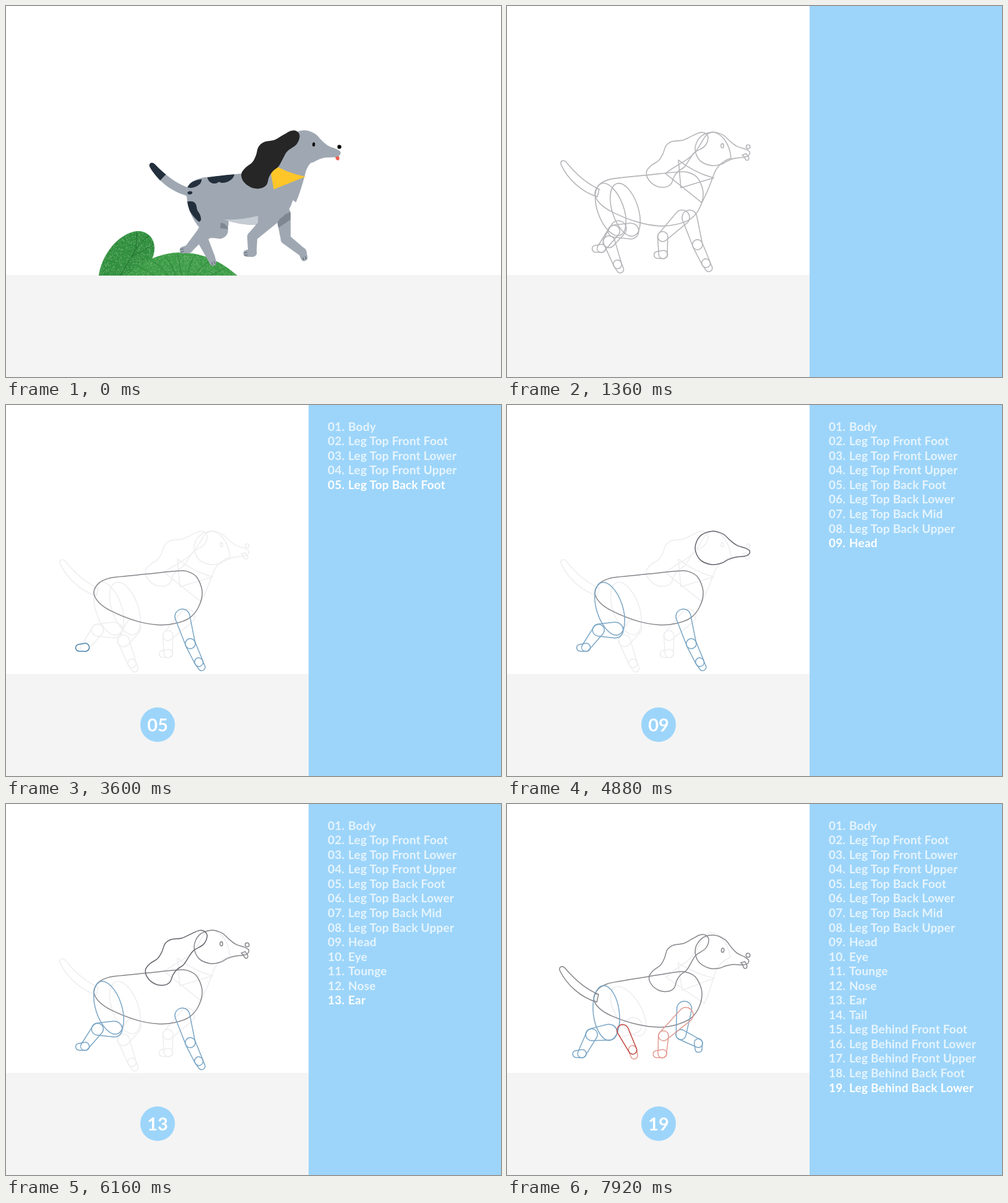
Recreate the animation shown at these times as an HTML page with a canvas. Size 800 px wide and 600 px high, loop 8000 ms.

```html
<!DOCTYPE html>
<html lang="en">
<head>
<meta charset="utf-8">
<title>Dog walk, layer by layer</title>
<style>
  html, body { margin: 0; width: 100%; height: 100%; overflow: hidden; background: #fff; }
  #stage { position: absolute; left: 0; top: 0; width: 800px; height: 600px; overflow: hidden; font-family: Lato, "Open Sans", sans-serif; font-weight: 700; color: #fff; }
  #floor { position: absolute; left: 0; top: 435px; width: 800px; height: 165px; background: #f4f4f4; }
  canvas { position: absolute; left: 0; top: 0; }
  #badge { position: absolute; left: 217px; top: 489px; width: 56px; height: 56px; border-radius: 50%; background: #9dd5fa; font-size: 29px; line-height: 55px; text-align: center; }
  #panel { position: absolute; left: 489px; top: 0; width: 311px; height: 600px; background: #9dd5fa; }
  ol { list-style: none; margin: 0; padding: 0; position: absolute; left: 31px; top: 22.7px; font-size: 19px; line-height: 23.56px; letter-spacing: .2px; white-space: nowrap; }
  li { height: 23.56px; }
  li b { display: inline-block; width: 33px; }
</style>
</head>
<body>
<div id="stage">
  <div id="floor"></div>
  <canvas id="paint" width="800" height="600"></canvas>
  <canvas id="ink" width="800" height="600"></canvas>
  <div id="badge"></div>
  <div id="panel"><ol id="list"></ol></div>
</div>
<script>
const LOOP = 8000, STRIDE = 640, STEP = 320, FIRST = 2080, SHIFT = 149;
const GREY = '#9fa8b2', DARK = '#232f3c', SHADE = '#7f8892';
const $ = id => document.getElementById(id);
const paint = $('paint').getContext('2d'), ink = $('ink').getContext('2d');

// Layer name, line family, part key
const layers = [
  ['Body', 'k', 'body'],
  ['Leg Top Front Foot', 'b', 'nfFoot'],
  ['Leg Top Front Lower', 'b', 'nfLower'],
  ['Leg Top Front Upper', 'b', 'nfUpper'],
  ['Leg Top Back Foot', 'b', 'nbFoot'],
  ['Leg Top Back Lower', 'b', 'nbLower'],
  ['Leg Top Back Mid', 'b', 'nbMid'],
  ['Leg Top Back Upper', 'b', 'nbUpper'],
  ['Head', 'k', 'head'],
  ['Eye', 'k', 'eye'],
  ['Tounge', 'k', 'tongue'],
  ['Nose', 'k', 'nose'],
  ['Ear', 'k', 'ear'],
  ['Tail', 'k', 'tail'],
  ['Leg Behind Front Foot', 'r', 'ffFoot'],
  ['Leg Behind Front Lower', 'r', 'ffLower'],
  ['Leg Behind Front Upper', 'r', 'ffUpper'],
  ['Leg Behind Back Foot', 'r', 'fbFoot'],
  ['Leg Behind Back Lower', 'r', 'fbLower']
];
const extras = ['fbMid', 'fbUpper', 'neck', 'scarf'];
const tones = { k: ['#64646d', '#85858b'], b: ['#4b83ad', '#79a5c5'], r: ['#bf463c', '#e19a91'] };

const two = n => String(n).padStart(2, '0');
const rows = layers.map(([name], i) => {
  const li = document.createElement('li'), num = document.createElement('b');
  num.textContent = two(i + 1) + '.';
  li.append(num, name);
  $('list').append(li);
  return li;
});

// Closed curve through a few points
function smooth(...v) {
  const n = v.length / 2, path = new Path2D();
  const x = i => v[((i + n) % n) * 2], y = i => v[((i + n) % n) * 2 + 1];
  path.moveTo(x(0), y(0));
  for (let i = 0; i < n; i++) {
    path.bezierCurveTo(
      x(i) + (x(i + 1) - x(i - 1)) / 6, y(i) + (y(i + 1) - y(i - 1)) / 6,
      x(i + 1) - (x(i + 2) - x(i)) / 6, y(i + 1) - (y(i + 2) - y(i)) / 6,
      x(i + 1), y(i + 1));
  }
  path.closePath();
  return path;
}

// Tapered limb: two circles joined by tangents
function limb(x1, y1, r1, x2, y2, r2) {
  const d = Math.hypot(x2 - x1, y2 - y1), a = Math.atan2(y2 - y1, x2 - x1);
  const b = Math.acos(Math.max(-1, Math.min(1, (r1 - r2) / d)));
  const path = new Path2D();
  path.arc(x1, y1, r1, a + b, a - b + 2 * Math.PI);
  path.arc(x2, y2, r2, a - b, a + b);
  path.closePath();
  return path;
}

function oval(x, y, rx, ry, deg = 0) {
  const path = new Path2D();
  path.ellipse(x, y, rx, ry, deg * Math.PI / 180, 0, 2 * Math.PI);
  path.closePath();
  return path;
}

const shape = {
  body: smooth(142,303, 150,288, 165,280.5, 185,277.5, 230,273, 275,268.5, 292,268.8, 308,278,
    317,301, 312,325, 297,344, 272,353.5, 245,355.5, 210,349, 170,333, 150,319),
  head: smooth(304,231, 312,212, 331,204, 349,208.5, 361,219, 372,227, 385,231.2, 392,235.5,
    390.5,241.5, 383,244.5, 369,246, 357,250, 347,255.5, 331,258, 312,250),
  ear: smooth(325,214, 321,206, 312,204.5, 299,210, 284,217, 267,219, 257,226, 252,239, 245,250,
    233,258, 225.5,268, 229,281, 241,291, 255,293, 265,288, 270,276, 277,267, 287,260, 295,248, 303,237, 319,227),
  tail: new Path2D('M149 296C127 287 110 270 96 253C91 247 85 251 87.500 257C98 279 119 300 146 308.500ZM144 295L149 296L146 308.500L143 307'),
  neck: new Path2D('M256 271C275 255 292 252 305 235C316 222 318 205 333 204C347 206 360 222 362 246C345 252 337 262 333 276C328 290 322 305 315 318Z'),
  scarf: new Path2D('M277 249Q302 269 334 278L281 294Z'),
  eye: new Path2D('M348 222.500Q350.200 222.500 350.200 226T348 229.300Q345.900 229.300 345.900 226T348 222.500Z'),
  tongue: new Path2D('M380 241L386.500 238.500L390.500 244Q392 249 388 249.500Q385 249 384 244Z'),
  nose: oval(389.7, 227.5, 3.2, 3.2),
  spots: new Path2D('M145 295C148 287 158 283 168 282C168 290 160 295 150 296ZM177 279C180 290 190 291 196 286C202 291 220 285 221 273ZM143 319C152 316 159 318 160 328C161 336 167 336 167 348L164 351C155 344 146 332 143 319Z'),
  dot: oval(149, 304, 4, 2.6, -8),
  belly: new Path2D('M196 347Q230 349 259 341V362H196Z'),
  tip: new Path2D('M80 240L108 260L113 270L101 281L80 275Z')
};

// Eight evenly spaced poses of one stride
// front: shoulder, knee, ankle, foot angle
const front = [
  [285,342, 298,386, 312,416, 60],
  [284,344, 275,388, 281,420, 115],
  [279,341, 243,375, 241,404, 175],
  [281,342, 249,373, 249,399, 172],
  [283,342, 251.5,373, 252,402, 176],
  [285,336, 266,369, 277,398, 130],
  [286.5,331, 281,373, 309,387, 88],
  [289,336, 293,377, 320,398, 72]
];
// back: thigh centre and tilt, hock, knee, ankle, foot angle
const back = [
  [166,329.5,18, 175,364, 148,364, 127,392, 176],
  [168,334,25, 179,361, 154,364, 156,394, 120],
  [171,335,30, 180,358, 162,366, 178,398, 75],
  [170,330,25, 181,358, 167,374, 182,406, 68],
  [167.5,329,20, 180,360, 165,381, 179,418, 62],
  [162,337,13, 172,367, 150,383, 151,417, 118],
  [160.5,338,7, 165,369, 137,373, 121,404, 176],
  [163,333,13, 172,363, 145,365, 121,393, 168]
];

function poseAt(keys, p) {
  const f = (p - Math.floor(p)) * 8, i = Math.floor(f), u = f - i;
  const k = j => keys[(i + j + 8) % 8];
  return k(0).map((b, c) => {
    const a = k(-1)[c], d = k(1)[c], e = k(2)[c];
    return b + u / 2 * (d - a + u * (2 * a - 5 * b + 4 * d - e + u * (3 * (b - d) + e - a)));
  });
}

function foot(x, y, deg) {
  const c = Math.cos(deg * Math.PI / 180), s = Math.sin(deg * Math.PI / 180);
  return limb(x - c * .8, y - s * .8, 6.6, x + c * 9, y + s * 9, 5.6);
}

function toes(x, y, deg) {
  const path = new Path2D();
  for (const k of [-2.2, 1.8]) {
    path.moveTo(8, k);
    path.lineTo(13, k * 1.1);
  }
  return turn(path, 0, 0, x, y, deg);
}

function turn(path, px, py, dx, dy, deg) {
  const out = new Path2D();
  out.addPath(path, new DOMMatrix().translate(px + dx, py + dy).rotate(deg).translate(-px, -py));
  return out;
}

function frontLeg(out, id, p, dx) {
  const [sx, sy, kx, ky, ax, ay, ang] = poseAt(front, p);
  out[id + 'Upper'] = limb(sx + dx, sy, 12, kx + dx, ky, 8);
  out[id + 'Lower'] = limb(kx + dx, ky, 8.2, ax + dx, ay, 6.8);
  out[id + 'Foot'] = foot(ax + dx, ay, ang);
  out[id + 'Toes'] = toes(ax + dx, ay, ang);
  out[id + 'Joint'] = [sx + dx, sy];
}

function backLeg(out, id, p, dx) {
  const [cx, cy, tilt, hx, hy, kx, ky, ax, ay, ang] = poseAt(back, p);
  out[id + 'Upper'] = oval(cx + dx, cy, 21, 44.5, -tilt);
  out[id + 'Mid'] = limb(hx + dx, hy, 12.8, kx + dx, ky, 9.8);
  out[id + 'Lower'] = limb(kx + dx, ky, 9.3, ax + dx, ay, 6.6);
  out[id + 'Foot'] = foot(ax + dx, ay, ang);
  out[id + 'Toes'] = toes(ax + dx, ay, ang);
  out[id + 'Joint'] = [hx + dx, hy];
}

function dogAt(p) {
  const w = 4 * Math.PI * p, out = {};
  const sway = (c, s) => c * (1 - Math.cos(w)) + s * Math.sin(w);
  const put = (names, px, py, dx, dy, deg) =>
    names.forEach(n => out[n] = turn(shape[n], px, py, dx, dy, deg));
  put(['body', 'spots', 'dot', 'belly'], 230, 310, sway(-.75, 0), sway(3.25, 5), sway(-1.8, -1.8));
  put(['head', 'eye', 'tongue', 'nose'], 331, 231, 0, sway(4, 7), sway(4.5, 1.1));
  put(['ear'], 315, 212, sway(.5, 0), sway(3.5, 6.5), sway(-1.5, 3.5));
  put(['tail', 'tip'], 147, 303, sway(-.5, 0), sway(6, 7), sway(-.5, 4));
  put(['neck', 'scarf'], 300, 275, sway(.5, -.5), sway(3, 2), sway(-2, 3));
  frontLeg(out, 'nf', p, 0);
  frontLeg(out, 'ff', p + .5, 10);
  backLeg(out, 'nb', p, 0);
  backLeg(out, 'fb', p + .5, 25);
  return out;
}

const leaves = [
  { fill: '#328f40', vein: '#1d6a2d', edge: new Path2D('M150 436C156 395 190 362 217 364C243 369 244 396 235 411C226 423 207 428 196 436Z'),
    lines: new Path2D('M185 436Q200 412 209 394Q222 377 232 371M210 393L212 365M203 405L239 386') },
  { fill: '#3d9c47', vein: '#2c8238', edge: new Path2D('M195 436C225 409 255 398 285 398.500C322 400 350 415 374 436Z'),
    lines: new Path2D('M284 436L277 400M262 436Q252 420 235 412M274 436Q268 415 256 404M294 436Q296 415 307 402M304 436Q318 418 333 410M240 436Q230 428 215 422M330 436L354 424') }
];
let seed = 7;
const rnd = () => (seed = seed * 16807 % 2147483647) / 2147483647;
const specks = new Path2D();
for (let i = 0; i < 2300; i++) specks.rect(150 + rnd() * 225, 363 + rnd() * 73, 1, 1);

function within(g, clip, draw) {
  g.save();
  g.clip(clip);
  draw();
  g.restore();
}

function fill(g, color, ...paths) {
  g.fillStyle = color;
  paths.forEach(p => g.fill(p));
}

function drawLeaves(g, x) {
  g.save();
  g.translate(x, 0);
  g.lineWidth = 1;
  for (const leaf of leaves) {
    fill(g, leaf.fill, leaf.edge);
    within(g, leaf.edge, () => {
      fill(g, '#78bd78', specks);
      g.strokeStyle = leaf.vein;
      g.stroke(leaf.lines);
    });
  }
  g.restore();
}

function drawDog(g, d, x) {
  const feet = ids => {
    g.strokeStyle = '#626b77';
    g.lineWidth = 1.3;
    ids.forEach(id => g.stroke(d[id + 'Toes']));
  };
  g.save();
  g.translate(x, 0);
  fill(g, GREY, d.ffUpper, d.ffLower, d.ffFoot, d.fbUpper, d.fbMid, d.fbLower, d.fbFoot);
  feet(['ff', 'fb']);
  const [sx, sy] = d.ffJoint, [hx, hy] = d.fbJoint;
  within(g, d.ffUpper, () => fill(g, SHADE, new Path2D(`M${sx - 16} ${sy + 9}L${sx + 14} ${sy - 4}V${sy + 8}L${sx - 16} ${sy + 28}Z`)));
  within(g, d.fbMid, () => fill(g, SHADE, new Path2D(`M${hx + 2} ${hy - 20}H${hx + 18}V${hy - 1}L${hx} ${hy - 4}Z`)));
  fill(g, GREY, d.tail);
  within(g, d.tail, () => fill(g, DARK, d.tip));
  fill(g, GREY, d.body, d.neck);
  within(g, d.body, () => fill(g, '#c5ccd3', d.belly));
  fill(g, GREY, d.nbUpper, d.nbMid, d.nbLower, d.nbFoot, d.nfUpper, d.nfLower, d.nfFoot);
  feet(['nb', 'nf']);
  const hide = new Path2D(d.body);
  hide.addPath(d.nbUpper);
  within(g, hide, () => fill(g, DARK, d.spots, d.dot));
  fill(g, '#ee5f55', d.tongue);
  fill(g, GREY, d.head);
  fill(g, '#ffc629', d.scarf);
  fill(g, '#262626', d.ear);
  fill(g, '#000', d.eye, d.nose);
  g.restore();
}

function drawLines(g, d, x, now, quiet) {
  g.save();
  g.translate(x, 0);
  g.lineJoin = 'round';
  const line = (key, color) => { g.strokeStyle = color; g.stroke(d[key]); };
  g.lineWidth = 1.6;
  extras.forEach(key => line(key, quiet));
  layers.forEach(([, , key], i) => { if (i > now) line(key, quiet); });
  g.lineWidth = 1.5;
  layers.forEach(([, tone, key], i) => { if (i < now) line(key, tones[tone][1]); });
  if (now >= 0) line(layers[now][2], tones[layers[now][1]][0]);
  g.restore();
}

const part = (t, a, b) => Math.max(0, Math.min(1, (t - a) / (b - a)));
const ease = u => u * u * (3 - 2 * u);

function pop(u) {
  const v = u - 1;
  return u <= 0 ? 0 : 1 + v * v * (2.4 * v + 1.4);
}

function render(t) {
  const dog = dogAt((t - 2320) / STRIDE);
  const slide = ease(part(t, 900, 1300)), bare = part(t, 1000, 1280);
  const x = SHIFT * (1 - slide);
  const now = t < 2000 ? -1 : Math.min(layers.length - 1, Math.max(0, Math.floor((t - FIRST) / STEP)));

  paint.clearRect(0, 0, 800, 600);
  if (bare < 1) {
    drawLeaves(paint, -.127 * t - SHIFT * slide);
    drawDog(paint, dog, x);
  }
  paint.canvas.style.opacity = 1 - bare;

  ink.clearRect(0, 0, 800, 600);
  const fade = part(t, 1840, 2000), mix = (a, b) => Math.round(a + (b - a) * fade);
  if (bare > 0) drawLines(ink, dog, x, now, `rgb(${mix(182, 238)},${mix(182, 238)},${mix(186, 240)})`);
  ink.canvas.style.opacity = bare;

  $('panel').style.transform = `translateX(${311 * (1 - slide)}px)`;
  $('badge').style.transform = `scale(${pop(part(t, 1860, 2160))})`;
  $('badge').textContent = two(Math.max(0, now) + 1);
  rows.forEach((row, i) => row.style.opacity = i > now ? 0 : i === now ? 1 : .75);
}

const start = performance.now();
function tick() {
  render((performance.now() - start) % LOOP);
  requestAnimationFrame(tick);
}
tick();
</script>
</body>
</html>
```
